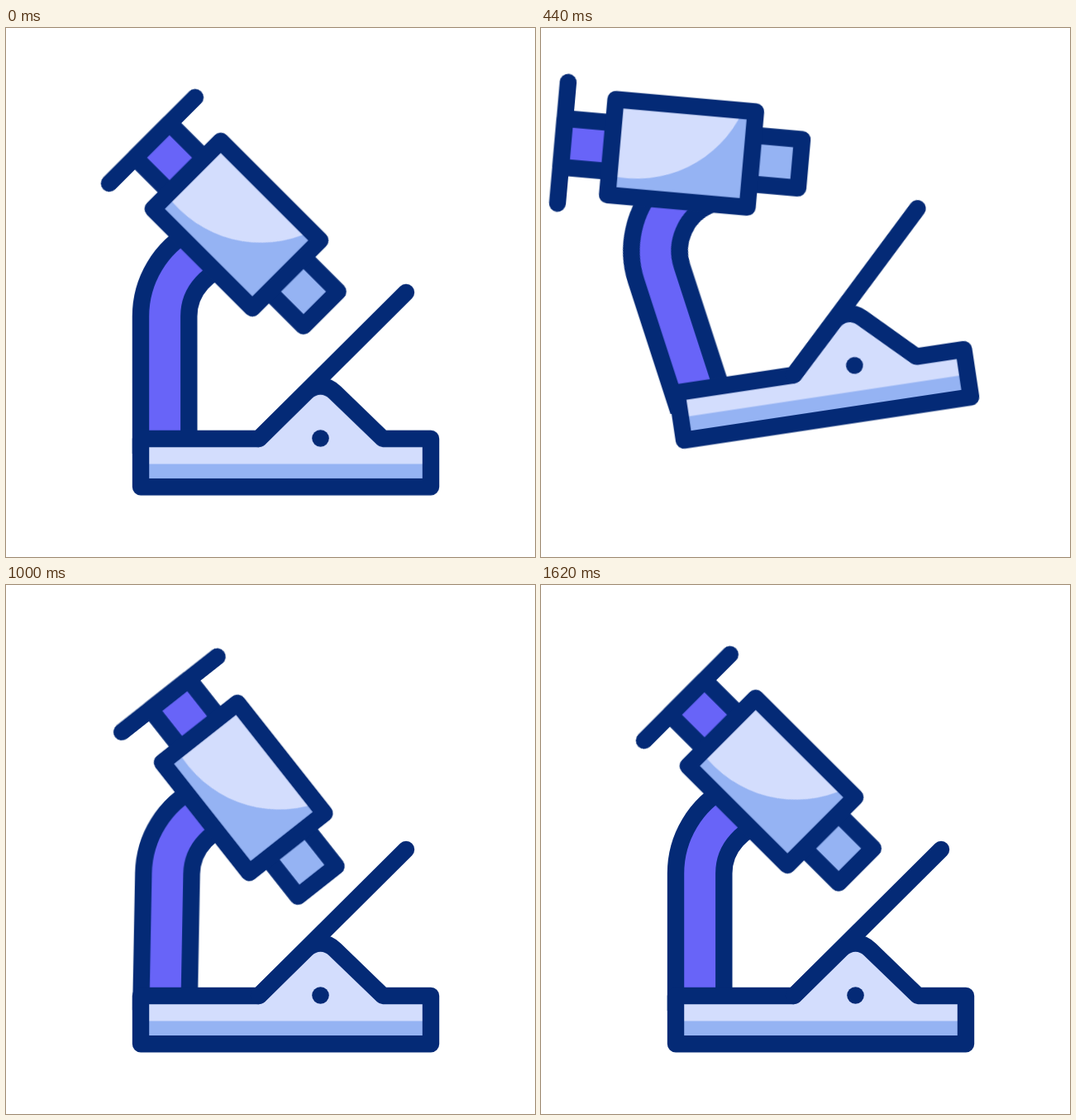
An HTML page that plays this animation: 640 px wide and 640 px high, repeating every 1700 ms.

```html
<!DOCTYPE html>
<html lang="en">
<head>
<meta charset="utf-8">
<title>Microscope</title>
<style>
  html, body { margin: 0; width: 100%; height: 100%; overflow: hidden; background: #fff; }
  svg { display: block; width: 100%; height: 100%; }

  .ink { stroke: #042a76; stroke-width: 20.4; stroke-linejoin: round; }
  .cap { stroke-linecap: round; }
  .none { fill: none; }
  .violet { fill: #6864f8; }
  .light { fill: #d3ddfd; }
  .mid { fill: #95b3f3; }
  .dot { fill: #042a76; }

  /* Each joint swings inside its parent: base > arm > tube. */
  .base, .arm, .tube {
    animation: 1700ms cubic-bezier(.167, .06, .833, .94) infinite;
  }
  .base { transform-origin: 380px 496px; animation-name: lift; }
  .arm  { transform-origin: 192px 526px; animation-name: lean; }
  .tube { transform-origin: 222px 270px; animation-name: nod; animation-delay: 40ms; }

  @keyframes lift {
    0%, 47.059%, 100% { transform: translate(0, 0) rotate(0deg); }
    23.529% { transform: translate(-1.3px, -95.2px) rotate(-9.25deg); }
  }
  @keyframes lean {
    0%, 94.118%, 100% { transform: rotate(0deg); }
    23.529% { transform: rotate(-10.6deg); }
    47.059% { transform: rotate(5.4deg); }
    70.588% { transform: rotate(-3.2deg); }
  }
  @keyframes nod {
    0%, 94.118%, 100% { transform: rotate(0deg); }
    23.529% { transform: rotate(-22deg); }
    47.059% { transform: rotate(11.3deg); }
    70.588% { transform: rotate(-3.2deg); }
  }
</style>
</head>
<body>
<svg viewBox="0 0 640 640">
  <g class="base">
    <g class="arm">
      <path class="ink violet" d="M163 515V349A118 118 0 0 1 225.6 244.8L275.8 289.2A60 60 0 0 0 221.3 349V515"/>
      <g class="tube">
        <g transform="rotate(45 279 238)">
          <rect class="ink violet" x="135" y="208.5" width="59" height="59"/>
          <path class="ink cap none" d="M134.8 164.5V311.5"/>
          <rect class="ink mid" x="364" y="208.5" width="59" height="59"/>
          <rect class="mid" x="194" y="180" width="170" height="116"/>
          <path class="light" d="M194 180H348.5A141 141 0 0 1 194 272.2Z"/>
          <rect class="ink none" x="194" y="180" width="170" height="116"/>
        </g>
      </g>
    </g>
    <path class="light" d="M163 497H306L363 441C373 431 388 431 398 441L456 497H514V555H163Z"/>
    <path class="mid" d="M163 527.5H514V555H163Z"/>
    <path class="ink none" d="M163 497H306L363 441C373 431 388 431 398 441L456 497H514V555.3H163Z"/>
    <path class="ink cap none" d="M306 497L484 320"/>
    <circle class="dot" cx="380.5" cy="496.5" r="10.3"/>
  </g>
</svg>
</body>
</html>
```
